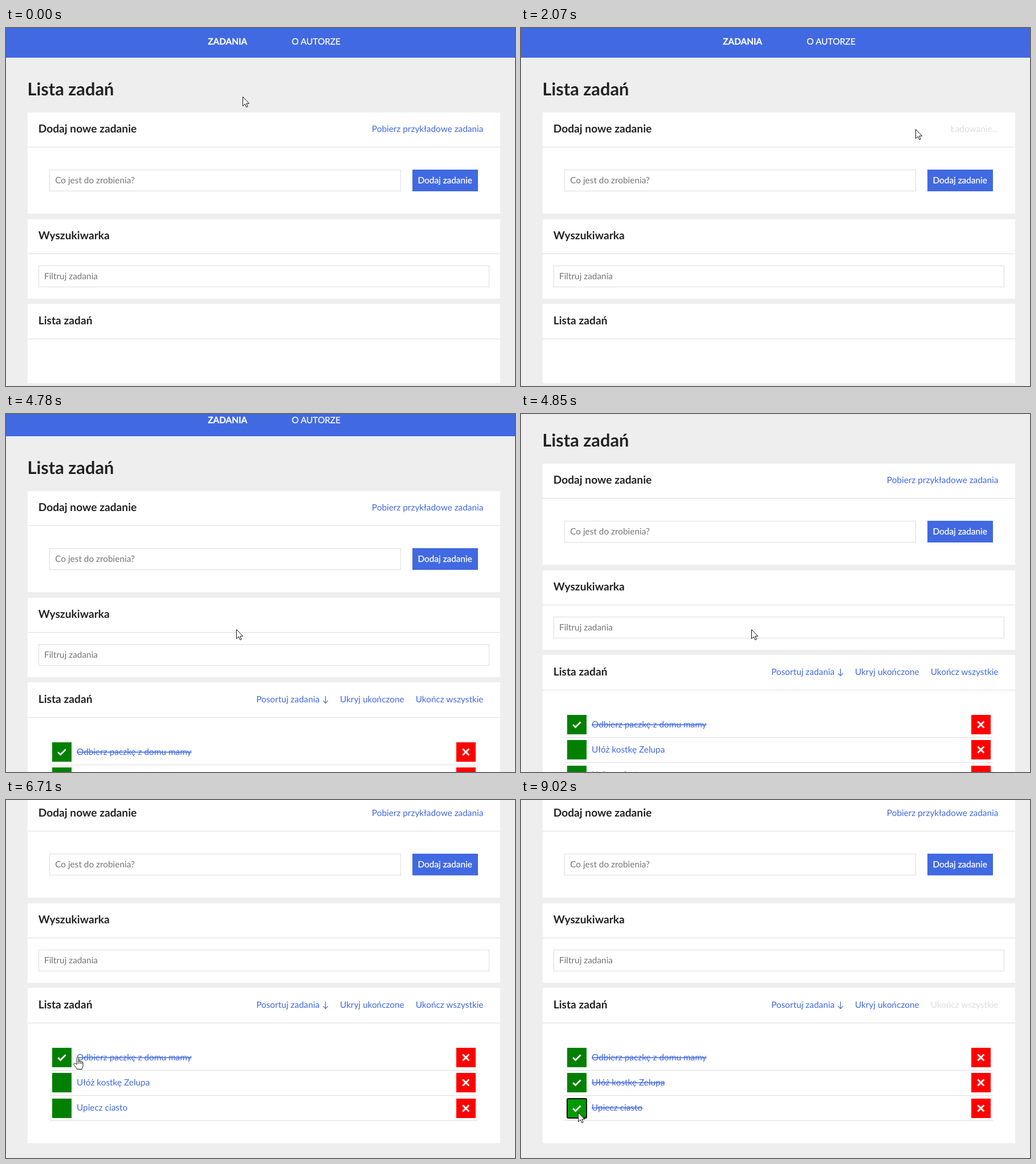
Animation, 893 px wide and 627 px high, one loop 9.88 s. Source, as an HTML page:

```html
<!DOCTYPE html>
<html lang="pl">
<head>
<meta charset="utf-8">
<title>Lista zadań</title>
<style>
  html, body { margin: 0; width: 100%; height: 100%; overflow: hidden; background: #eee; }
  svg { display: block; width: 893px; height: 627px; }
  text { font: 15.36px Lato, sans-serif; fill: #222; text-rendering: geometricPrecision; white-space: pre; }
  .h1 { font-size: 30.72px; font-weight: 700; }
  .h2 { font-size: 19.2px; font-weight: 700; }
  .bold { font-weight: 700; }
  .white { fill: #fff; stroke: #fff; stroke-width: .25px; }
  .hint { fill: #757575; }
  .link { fill: #4169e1; }
  .end { text-anchor: end; }
</style>
</head>
<body>
<svg id="stage" viewBox="0 0 893 627"></svg>
<script>
const LOOP = 9880;
const BLUE = [65, 105, 225], LIGHT_BLUE = [78, 126, 255], GREY = [221, 221, 221];
const GREEN = "#008000", LIGHT_GREEN = "#009a00";
const LINK_PRESS = 1440, LINK_RELEASE = 1520, LOADED = 3930, CLICK = 80;
const SCROLL = { start: 4730, end: 5010, distance: 154 };

const TASKS = [
  { name: "Odbierz paczkę z domu mamy", press: -CLICK },
  { name: "Ułóż kostkę Zelupa", press: 7480 },
  { name: "Upiecz ciasto", press: 8470 }
];

// Each move starts where the one before it ended; bend above 1 delays the vertical part
const HOME = { x: 415, y: 120 };
const MOVES = [
  { start: 210, end: 1130, x: 690, y: 182 },
  { start: 1210, end: 1400, x: 692, y: 177 },
  { start: 4310, end: 4700, x: 404, y: 377, bend: 3 },
  { start: 6250, end: 6710, x: 126, y: 450 },
  { start: 6710, end: 7170, x: 94, y: 468 },
  { start: 7250, end: 7480, x: 97, y: 493 },
  { start: 8010, end: 8470, x: 100, y: 547 }
];

const stage = document.getElementById("stage");

function add(parent, tag, attrs = {}, content = "") {
  const node = document.createElementNS("http://www.w3.org/2000/svg", tag);
  for (const key in attrs) node.setAttribute(key, attrs[key]);
  node.textContent = content;
  parent.appendChild(node);
  return node;
}
const rect = (parent, x, y, width, height, fill, extra) =>
  add(parent, "rect", { x, y, width, height, fill, ...extra });
const label = (parent, x, y, content, cls = "") => add(parent, "text", { x, y, class: cls }, content);
const path = (parent, d, stroke, width, extra) =>
  add(parent, "path", { d, stroke, "stroke-width": width, fill: "none", ...extra });
const ring = (parent, x, y, width, height) =>
  rect(parent, x, y, width, height, "none", { stroke: "#101010", "stroke-width": 2, rx: 2 });
const field = (x, y, width, height) =>
  rect(page, x + .5, y + .5, width - 1, height - 1, "#fff", { stroke: "#ddd" });
const show = (node, visible) => node.setAttribute("display", visible ? "inline" : "none");

// Edges and baselines snap to whole pixels
function section(top, bottom, title) {
  const y = Math.round(top);
  const panel = rect(page, 38, y, 829, bottom - y, "#fff");
  rect(page, 38, Math.round(top + 60.5), 829, 1, "#ddd");
  label(page, 56.7, Math.round(top + 35.4), title, "h2");
  return panel;
}

const page = add(stage, "g");
rect(page, 0, 0, 893, 52, "#4169e1");
label(page, 354.2, 29, "ZADANIA", "bold white");
label(page, 501.2, 29, "O AUTORZE", "white");
label(page, 37.5, 118, "Lista zadań", "h1");

section(147.8, 325, "Dodaj nowe zadanie");
const fetchLink = label(page, 837.4, 182, "", "end");
const fetchRing = ring(page, 632, 166, 216, 23);
field(76, 248, 617, 38);
label(page, 86.2, 272, "Co jest do zrobienia?", "hint");
rect(page, 713, 248, 115, 38, "#4169e1");
label(page, 722.5, 272, "Dodaj zadanie", "white");

section(334.8, 474, "Wyszukiwarka");
field(57, 416, 791, 38);
label(page, 67, 440, "Filtruj zadania", "hint");

section(483.2, 622, "Lista zadań");
const list = add(page, "g");
rect(list, 38, 622, 829, 133, "#fff");
label(list, 439.2, 518, "Posortuj zadania", "link");
path(list, "M560.5 507V519.5M556.3 515.2L560.5 519.5L564.7 515.2", "#4169e1", 1.2);
label(list, 698.7, 518, "Ukryj ukończone", "link end");
const finishAll = label(list, 837.5, 518, "Ukończ wszystkie", "end");

const rows = TASKS.map(({ name, press }, i) => {
  const y = Math.round(588 + 44.3 * i);
  const row = add(list, "g");
  const box = rect(row, 81, y, 34, 34, GREEN);
  const check = path(row, `M91.2 ${y + 17.3}L95.6 ${y + 21.6}L104.6 ${y + 12.5}`, "#fff", 2.8);
  const focus = ring(row, 81, y, 34, 34);
  const text = label(row, 124, 610 + 44 * i, name, "link");
  rect(row, 790, y, 34, 34, "#f00");
  path(row, `M801.3 ${y + 11.5}l11 11m0 -11l-11 11`, "#fff", 3);
  rect(row, 76, Math.round(627 + 44.2 * i), 752, 1, "#ddd");
  return { y, press, box, check, focus, text };
});

const pointer = add(stage, "g");
const arrow = path(pointer, "M.5 .5V16.6L4.3 13.1L6.8 18.6L9.2 17.6L6.7 12.2H11.6Z", "#111", 1, { fill: "#fff" });
const hand = path(pointer,
  "M-1.5 13V2.2C-1.5 0 1.6 0 1.6 2.2V8.3C1.9 6.6 4.3 6.8 4.4 8.5" +
  "C4.9 7.2 6.9 7.5 7 9.1C7.6 8.3 9.1 8.7 9.1 10.2V15C9.1 17.4 7.5 18.6 7.2 21.5H-1.6" +
  "C-2 19.3 -5 16.6 -6.9 13.5C-8 11.5 -5.4 10.3 -4 11.7Z" +
  "M1.6 8V12M4.4 8.5V12M7 9.2V12.5", "#111", 1, { fill: "#fff", "stroke-linejoin": "round" });

const progress = (t, start, end) => Math.min(1, Math.max(0, (t - start) / (end - start)));
const ease = k => k * k * (3 - 2 * k);
const mix = (a, b, k) => a + (b - a) * k;

function fade(from, to, start, duration, t) {
  const k = progress(t, start, start + duration);
  return `rgb(${from.map((v, i) => Math.round(mix(v, to[i], k)))})`;
}

function pointerAt(t) {
  let { x, y } = HOME;
  for (const move of MOVES) {
    const k = ease(progress(t, move.start, move.end));
    x = mix(x, move.x, k);
    y = mix(y, move.y, k ** (move.bend || 1));
  }
  return [Math.round(x), Math.round(y)];
}

function linkColor(t) {
  if (t < LINK_RELEASE) return fade(BLUE, LIGHT_BLUE, 860, 200, t);
  if (t < LOADED) return fade(LIGHT_BLUE, GREY, LINK_RELEASE, 330, t);
  if (t < 4310) return fade(GREY, LIGHT_BLUE, LOADED, 230, t);
  return fade(LIGHT_BLUE, BLUE, 4310, 230, t);
}

function render(t) {
  const scroll = Math.round(SCROLL.distance * ease(progress(t, SCROLL.start, SCROLL.end)));
  const [x, y] = pointerAt(t);
  const loaded = t >= LOADED;
  page.setAttribute("transform", `translate(0 ${-scroll})`);

  fetchLink.textContent = t >= LINK_RELEASE && !loaded ? "Ładowanie..." : "Pobierz przykładowe zadania";
  fetchLink.style.fill = linkColor(t);
  show(fetchRing, t >= LINK_PRESS && t < LINK_RELEASE);

  show(list, loaded);
  finishAll.style.fill = fade(BLUE, GREY, TASKS[2].press + CLICK, 450, t);

  const focused = rows.filter(row => row.press > 0 && t >= row.press).pop();
  for (const row of rows) {
    const top = row.y - scroll;
    const hovered = x >= 81 && x < 115 && y >= top && y < top + 34;
    const done = t >= row.press + CLICK;
    row.box.setAttribute("fill", hovered ? LIGHT_GREEN : GREEN);
    row.text.style.textDecoration = done ? "line-through" : "none";
    show(row.check, done);
    show(row.focus, row === focused);
  }

  const overTask = t > SCROLL.end && x >= 124 && x <= 325 && y > 441 && y < 460;
  show(hand, overTask);
  show(arrow, !overTask);
  pointer.setAttribute("transform", `translate(${x} ${y})`);
}

const begin = performance.now();
function tick() {
  render((performance.now() - begin) % LOOP);
  requestAnimationFrame(tick);
}
tick();
</script>
</body>
</html>
```
